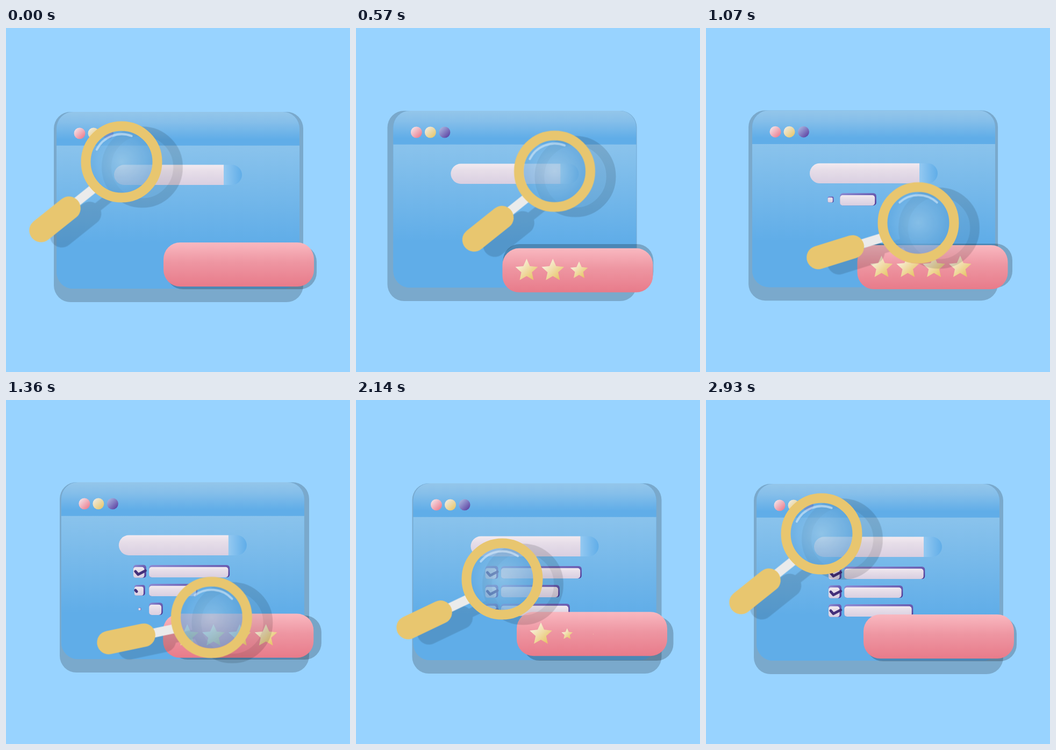
An HTML page that plays this animation: 640 by 640 pixels, repeating every 3000 ms.

```html
<!DOCTYPE html>
<html lang="en">
<head>
<meta charset="utf-8">
<title>Search window</title>
<style>
html, body { margin: 0; width: 100%; height: 100%; overflow: hidden; background: #98d3ff; }
svg { display: block; width: 100%; height: 100%; }
</style>
</head>
<body>
<svg viewBox="0 0 640 640">
  <defs>
    <linearGradient id="header" x2="0" y2="1"><stop stop-color="#94c6ea"/><stop offset=".3" stop-color="#86bfea"/><stop offset=".82" stop-color="#60ade8"/></linearGradient>
    <linearGradient id="body" x2="0" y2="1"><stop stop-color="#8ac3ec"/><stop offset=".68" stop-color="#60ade8"/></linearGradient>
    <linearGradient id="paper" x2="0" y2="1"><stop stop-color="#f2eaf0"/><stop offset=".35" stop-color="#e6dde8"/><stop offset="1" stop-color="#d9cfe1"/></linearGradient>
    <linearGradient id="button"><stop stop-color="#94c9f1"/><stop offset="1" stop-color="#60ade8"/></linearGradient>
    <linearGradient id="purple" x2="1" y2="1"><stop stop-color="#8d8cd4"/><stop offset="1" stop-color="#4b3391"/></linearGradient>
    <linearGradient id="pink" x2="0" y2="1"><stop stop-color="#f9b8c0"/><stop offset=".45" stop-color="#ee96a2"/><stop offset="1" stop-color="#e87b8a"/></linearGradient>
    <linearGradient id="gold" x2="1" y2="1"><stop offset=".15" stop-color="#f9f2e2"/><stop offset=".85" stop-color="#e8c66c"/></linearGradient>
    <linearGradient id="dotPink" x2="1" y2="1"><stop offset=".1" stop-color="#f4e3e8"/><stop offset=".85" stop-color="#ec8394"/></linearGradient>
    <linearGradient id="dotGold" x2="1" y2="1"><stop offset=".1" stop-color="#efebe2"/><stop offset=".85" stop-color="#e8c973"/></linearGradient>
    <linearGradient id="dotPurple" x2="1" y2="1"><stop offset=".1" stop-color="#a9b4df"/><stop offset=".85" stop-color="#6149a6"/></linearGradient>
    <radialGradient id="glass"><stop stop-color="#9accee" stop-opacity=".64"/><stop offset="1" stop-color="#60a8e0" stop-opacity=".62"/></radialGradient>
    <g id="grip">
      <rect x="50" y="-8.5" width="42" height="17"/>
      <rect x="-55" y="-21.8" width="110" height="43.6" rx="21.8"/>
    </g>
  </defs>

  <rect id="windowShadow" width="464" height="354" rx="31" opacity=".2"/>
  <g id="window">
    <rect width="452" height="329" rx="31" fill="#60ade8"/>
    <path d="M0 62.5H452V298a31 31 0 0 1-31 31H31a31 31 0 0 1-31-31z" fill="url(#body)"/>
    <path d="M0 62.5V31A31 31 0 0 1 31 0H421a31 31 0 0 1 31 31V62.5z" fill="url(#header)"/>
    <circle cx="43" cy="40" r="10.5" fill="url(#dotPink)"/>
    <circle cx="69" cy="40" r="10.5" fill="url(#dotGold)"/>
    <circle cx="95.5" cy="40" r="10.5" fill="url(#dotPurple)"/>
    <path d="M311 98.5h15.3a18.7 18.7 0 0 1 0 37.4H311z" fill="url(#button)"/>
    <path d="M311 98.5V135.9H125.7a18.7 18.7 0 0 1 0-37.4z" fill="url(#paper)"/>
    <g id="rows"></g>
    <rect x="204" y="248" width="280" height="82" rx="31" opacity=".22"/>
  </g>
  <g id="rating"><rect width="280" height="82" rx="31" fill="url(#pink)"/></g>

  <g id="lensShadow" opacity=".13">
    <g class="turn"><use href="#grip" transform="translate(-163.7) rotate(2.2)"/></g>
    <circle r="66.5" fill="none" stroke="#000" stroke-width="18"/>
    <circle r="57.5" opacity=".45"/>
  </g>
  <g id="lens">
    <circle r="58" fill="url(#glass)"/>
    <g class="turn">
      <path id="shine" fill="none" stroke="#d9ecfa" stroke-opacity=".6" stroke-width="4" stroke-linecap="round"/>
      <g transform="translate(-163.7) rotate(2.2)" fill="#e8c66f">
        <rect x="50" y="-8.5" width="42" height="17" fill="#ebebeb"/>
        <rect x="-55" y="-21.8" width="110" height="43.6" rx="21.8"/>
      </g>
    </g>
    <circle r="66.5" fill="none" stroke="#e8c66f" stroke-width="18"/>
  </g>
</svg>
<script>
const LOOP = 3000, STEPS = 42;
const $ = id => document.getElementById(id);
const clamp = v => Math.min(1, Math.max(0, v));

function add(parent, name, attributes = {}) {
  const node = document.createElementNS('http://www.w3.org/2000/svg', name);
  for (const key in attributes) node.setAttribute(key, attributes[key]);
  return parent.appendChild(node);
}

// Smooth curve through [step, value] keys that rests at its extremes.
function track(...keys) {
  const slope = i => (keys[i + 1][1] - keys[i][1]) / (keys[i + 1][0] - keys[i][0]);
  const tangent = keys.map((_, i) => {
    if (i === 0 || i === keys.length - 1) return 0;
    const a = slope(i - 1), b = slope(i);
    return a * b <= 0 ? 0 : 2 * a * b / (a + b);
  });
  return step => {
    if (step >= keys.at(-1)[0]) return keys.at(-1)[1];
    const i = keys.findIndex((key, n) => step < keys[n + 1][0]);
    const [t0, v0] = keys[i], [t1, v1] = keys[i + 1];
    const span = t1 - t0, u = (step - t0) / span, w = 1 - u;
    return v0 * w * w * (1 + 2 * u) + v1 * u * u * (1 + 2 * w)
      + span * u * w * (tangent[i] * w - tangent[i + 1] * u);
  };
}

const windowX = track([0, 94], [9, 68.5], [15, 86], [24, 119.2], [25, 119.8], [30, 106.5], [34, 97.7], [40, 94]);
const windowY = track([0, 156], [8, 154], [19, 153], [30, 155], [34, 155.6], [40, 156]);
const ratingX = track([0, 293], [9, 271.7], [15, 281.5], [25, 304.2], [30, 299], [34, 295], [40, 293]);
const ratingY = track([0, 399], [9, 410.2], [15, 404], [25, 390.4], [30, 394.2], [34, 397.6], [40, 399]);
const lensX = track([0, 215], [8, 369.5], [15, 395], [24, 347], [30, 272], [34, 232], [40, 215]);
const lensY = track([0, 249], [8, 266.5], [15, 362.5], [24, 433.5], [30, 333], [34, 274.5], [40, 249]);
const lensTurn = track([0, 40.8], [8, 40.8], [15, 19.5], [24, 10.9], [30, 27.7], [34, 37], [40, 40.8]);

const polar = (radius, degrees) => {
  const a = degrees * Math.PI / 180;
  return `${radius * Math.cos(a)} ${radius * Math.sin(a)}`;
};
$('shine').setAttribute('d', `M${polar(51.5, -113)}A51.5 51.5 0 0 1 ${polar(51.5, -28)}`);

const starPoints = Array.from({ length: 10 }, (_, i) => polar(i % 2 ? 10.3 : 22, i * 36 - 90)).join(' ');
const stars = [[1, 30], [3.3, 28], [5.66, 26.15], [8, 23.4]].map(([grow, shrink], i) => ({
  grow, shrink, x: 45 + i * 48.8,
  node: add($('rating'), 'polygon', { points: starPoints, fill: 'url(#gold)' })
}));

const rows = [150, 109, 128].map((width, i) => {
  const row = add($('rows'), 'g', { transform: `translate(0 ${154 + 35 * i})` });
  const box = add(row, 'g');
  add(box, 'rect', { x: -12, y: -12, width: 24, height: 24, rx: 5, fill: 'url(#purple)' });
  add(box, 'rect', { x: -12, y: -8, width: 20.5, height: 20, rx: 4.5, fill: 'url(#paper)' });
  const tick = add(row, 'path', {
    d: 'M138 11.8L143 17.6L156.5 10.6', pathLength: 1, fill: 'none', stroke: '#43307a',
    'stroke-width': 5, 'stroke-linecap': 'round', 'stroke-linejoin': 'round', 'stroke-dasharray': '1 2'
  });
  const back = add(row, 'rect', { x: 163.3, y: 0, height: 23, rx: 5.5, fill: 'url(#purple)' });
  const face = add(row, 'rect', { x: 163.3, y: 3.8, height: 19.2, rx: 5, fill: 'url(#paper)' });
  return { width, start: 13.2 + 2.5 * i, row, box, tick, back, face };
});

function move(node, x, y, extra = '') {
  node.setAttribute('transform', `translate(${x} ${y}) ${extra}`);
}

function draw(time) {
  const step = Math.floor((time % LOOP + 5) / (LOOP / STEPS)) % STEPS;
  const x = windowX(step), y = windowY(step);
  move($('window'), x, y);
  move($('windowShadow'), x - 5 - 0.24 * (94 - x), y);
  move($('rating'), ratingX(step), ratingY(step));

  for (const { node, x, grow, shrink } of stars) {
    const scale = clamp((step - grow) / 3) * clamp(1 - (step - shrink) / 4);
    move(node, x, 41.5, `scale(${scale})`);
  }

  for (const { width, start, row, box, tick, back, face } of rows) {
    const shown = clamp((step - start) / 4), drawn = clamp((step - start - 3) / 2);
    row.style.display = shown ? '' : 'none';
    move(box, 146, 11.8, `scale(${shown})`);
    tick.style.display = drawn ? '' : 'none';
    tick.setAttribute('stroke-dashoffset', 1 - drawn);
    back.setAttribute('width', width * shown);
    face.setAttribute('width', Math.max(0, width * shown - 2.6));
  }

  const lx = lensX(step), ly = lensY(step);
  move($('lens'), lx, ly);
  move($('lensShadow'), lx + 38.5, ly + 9.8);
  for (const node of document.querySelectorAll('.turn')) {
    node.setAttribute('transform', `rotate(${-lensTurn(step)})`);
  }
}

const begin = performance.now();
function tickFrame() {
  draw(performance.now() - begin);
  requestAnimationFrame(tickFrame);
}
tickFrame();
</script>
</body>
</html>
```
